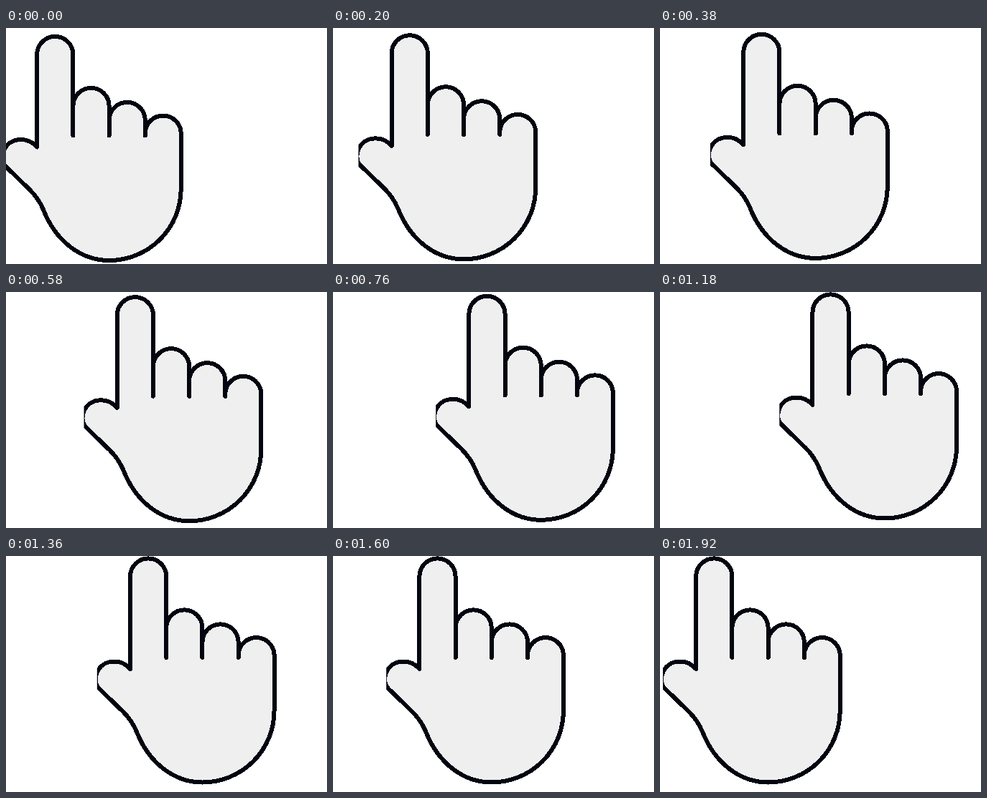
Recreate the animation shown at these times as an HTML page. Size 447 px wide and 330 px high, loop 1940 ms.

```html
<!DOCTYPE html>
<html lang="en">
<head>
<meta charset="utf-8">
<title>Pointing hand</title>
<style>
  html, body { margin: 0; width: 100%; height: 100%; overflow: hidden; background: #fff; }
  svg { display: block; }
</style>
</head>
<body>
<svg width="447" height="330" viewBox="0 0 447 330" shape-rendering="crispEdges">
  <clipPath id="edge"><rect x="-3" width="300" height="340"/></clipPath>
  <g id="hand" clip-path="url(#edge)" fill="#efefef" stroke="#02050f" stroke-width="6"
     stroke-linecap="round" stroke-linejoin="round">
    <path d="M43.2 166.5V37a25.1 25.1 0 0 1 50.2 0V109
      a25.1 25.1 0 0 1 50.2 0V129
      a25.1 25.1 0 0 1 50.2 0V146
      a25 25 0 0 1 49.9 0V225
      A100 100 0 0 1 143.5 325
      C106 325 70 300 52 254C47 242 41 234 33 226L0 194
      C-11 184 -4 156 21 156Q34 156 43.2 166.5Z"/>
    <path d="M93.4 109V150.5M143.6 129V150.5M193.8 146V150.5"/>
  </g>
</svg>
<script>
  const LOOP = 1940, STEP = 20, TURN = 1040;
  const hand = document.getElementById('hand');
  const start = performance.now();

  function draw(now) {
    const elapsed = Math.max(0, now - start) % LOOP;
    const t = Math.floor(elapsed / STEP) * STEP;
    // Glide right while rising, then return level and slightly faster.
    const out = Math.min(t / TURN, 1);
    const x = 200 * out - Math.max(0, t - TURN) * 0.2193;
    const y = -8.5 * out;
    hand.setAttribute('transform', `translate(${x} ${y})`);
    requestAnimationFrame(draw);
  }
  draw(start);
</script>
</body>
</html>
```
